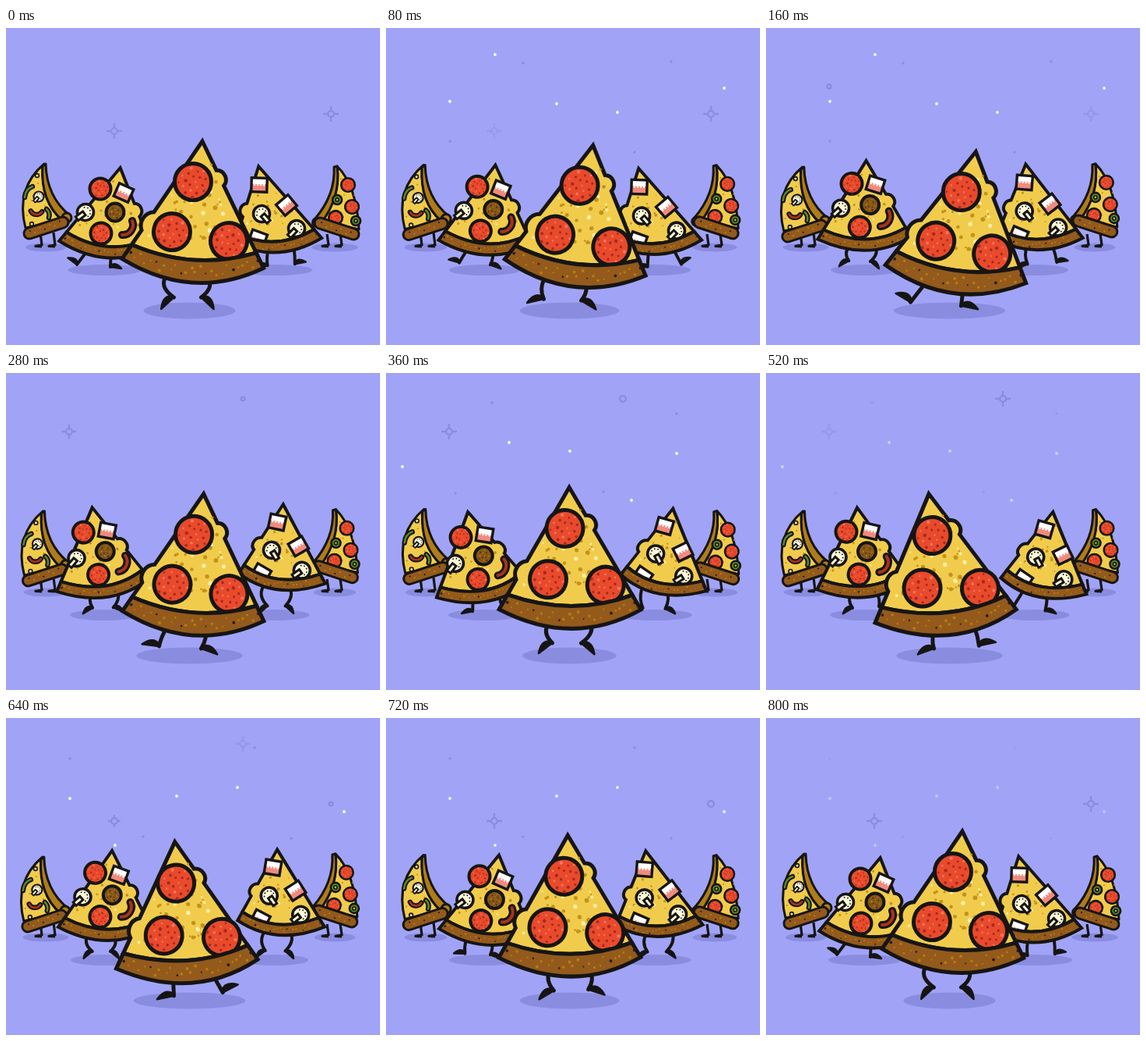
Recreate the animation shown at these times as an HTML page with a canvas. Size 480x406 px, loop 0.84 s.

```html
<!DOCTYPE html>
<html lang="en">
<head>
<meta charset="utf-8">
<title>Walking pizza slices</title>
<style>
html, body { margin: 0; width: 100%; height: 100%; overflow: hidden; background: #a1a4f6; }
canvas { display: block; width: 480px; height: 406px; }
</style>
</head>
<body>
<canvas id="stage"></canvas>
<script>
const W = 480, H = 406, LOOP = 840, STEP = 40, WALK = 800;
const SKY = '#a1a4f6', INK = '#161514', CHEESE = '#f1cc4c', CRUST = '#935a1c', RED = '#e94a2b',
      CREAM = '#fdf8d8', GOLD = '#bd8a14', GREEN = '#5f8c22', SHADE = '#8a8ce0';
const { PI, sin, cos, hypot, min, max, floor, sqrt } = Math;

const canvas = document.getElementById('stage'), ctx = canvas.getContext('2d');
const dpr = window.devicePixelRatio || 1;
canvas.width = W * dpr;
canvas.height = H * dpr;

let seed = 11;
const rnd = () => (seed = (seed * 16807) % 2147483647) / 2147483647;
const times = (n, f) => Array.from({ length: n }, (_, i) => f(i));
const wave = p => cos(2 * PI * p);
const along = ([ax, ay], [bx, by], t) => [ax + (bx - ax) * t, ay + (by - ay) * t];

function dot(x, y, r, color) {
  ctx.beginPath();
  ctx.arc(x, y, r, 0, 2 * PI);
  ctx.fillStyle = color;
  ctx.fill();
}
function disc(x, y, r, color, line) {
  dot(x, y, r, color);
  ctx.lineWidth = line;
  ctx.strokeStyle = INK;
  ctx.stroke();
}
function stroke(d, color, width) {
  ctx.lineWidth = width;
  ctx.strokeStyle = color;
  ctx.stroke(new Path2D(d));
}
function shape(d, color, line) {
  ctx.fillStyle = color;
  ctx.fill(new Path2D(d));
  stroke(d, INK, line);
}
function tube(d, color, outer, inner) {
  ctx.lineCap = 'round';
  stroke(d, INK, outer);
  stroke(d, color, inner);
  ctx.lineCap = 'butt';
}
function at(x, y, angle, draw) {
  ctx.save();
  ctx.translate(x, y);
  ctx.rotate(angle);
  draw();
  ctx.restore();
}
function shadow(x, y, rx, ry) {
  ctx.beginPath();
  ctx.ellipse(x, y, rx, ry, 0, 0, 2 * PI);
  ctx.fillStyle = SHADE;
  ctx.fill();
}

// Toppings, each drawn around its own centre
const specks = times(20, i => {
  const a = i * 2.4, d = 0.85 * sqrt((i + 0.5) / 20);
  return [d * cos(a), d * sin(a), 0.05 + 0.05 * rnd(), i % 3 ? '#a52a22' : '#f4775c'];
});
const pepperoni = (r, line) => () => {
  disc(0, 0, r, RED, line);
  for (const [x, y, s, c] of specks) dot(x * r, y * r, s * r, c);
};
const meat = r => () => {
  disc(0, 0, r, '#865619', 4);
  specks.slice(0, 12).forEach(([x, y, s], i) => dot(x * r, y * r, s * r, i % 2 ? '#3a2410' : GOLD));
};
const olive = r => () => {
  disc(0, 0, r, GREEN, 2.6);
  disc(0, 0, r * 0.35, '#a9c24a', 1.6);
};
// Stem points along +x
const mushroom = r => () => {
  ctx.scale(r / 10, r / 10);
  disc(0, 0, 10, CREAM, 3.4);
  shape('M2 -2.8H13V2.8H2Z', CREAM, 2.8);
  for (let a = 2; a < 5; a += 0.7) dot(6 * cos(a), 6 * sin(a), 0.9, INK);
};
const ham = () => {
  ctx.fillStyle = '#fff';
  ctx.fillRect(-10, -9, 20, 18);
  ctx.fillStyle = '#f08a7e';
  ctx.fillRect(-10, -1, 20, 10);
  for (const x of [-6, -2, 2, 6]) dot(x, x % 4 ? 0 : 4, 1.2, '#fff');
  ctx.lineWidth = 3.4;
  ctx.strokeStyle = INK;
  ctx.strokeRect(-10, -9, 20, 18);
};
const chili = () => tube('M5 -10A13 13 0 0 1 -8 8', '#a8331c', 10, 4);

// x, y: middle of the crust line; phase: when the tip is furthest right; beat: when the body is lowest
const slices = [
  {
    x: 126, y: 273, half: 60, h: 99, lean: 0, swing: 19, shift: 2, tilt: -0.044, roll: 0.134, drift: 2.7,
    phase: 0.97, beat: 0, bob: 5, feet: 122.5, ground: 306, size: 0.65, line: 4, sag: 0.26, freckles: 26,
    bumpR: [0.52, 9, 6],
    toppings: [
      [121, 206, 0, pepperoni(13.5, 4)], [122, 263, 2, pepperoni(13.5, 4)], [151, 211, 0.42, ham],
      [102, 236, 2.5, mushroom(10.5)], [140, 236, 0, meat(11.5)], [157, 257, 0, chili]]
  },
  {
    x: 353, y: 269, half: 56, h: 95, lean: -5, swing: 21, shift: 4, tilt: 0.075, roll: 0.14, drift: 1.5,
    phase: 0.55, beat: 0.08, bob: 6, feet: 347, ground: 306, size: 0.65, line: 4, sag: 0.26, freckles: 32,
    bumpL: [0.57, 9, 6],
    toppings: [
      [325, 201, 0.03, ham], [360, 227, -0.7, ham], [323, 270, 0.35, ham],
      [328, 238, 0.85, mushroom(10.5)], [373, 257, 2.35, mushroom(10.5)]]
  },
  {
    x: 237, y: 309, half: 91, h: 156.5, lean: 2, swing: 24, shift: 6.5, tilt: 0.017, roll: 0.113, drift: 3.5,
    phase: 0.18, beat: 0.25, bob: 7.5, feet: 233, ground: 357, size: 1, line: 5, sag: 0.18, freckles: 62,
    bumpR: [0.29, 11, 7], bumpL: [0.68, 14, 7],
    toppings: [[240, 197, 0, pepperoni(23.5, 5)], [213, 261, 1, pepperoni(23.5, 5)], [286, 273, 2, pepperoni(23.5, 5)]]
  }
];

function pose(s, p) {
  const sway = wave(p - s.phase), beat = wave(2 * (p - s.beat));
  const x = s.x + s.shift * sway, y = s.y + s.bob * beat, angle = s.tilt + s.roll * sway;
  const cx = s.half * cos(angle), cy = s.half * sin(angle);
  return {
    x, y, angle, sway, up: (1 - beat) / 2,
    tip: [x + s.lean + s.swing * sway, y - s.h], left: [x - cx, y - cy], right: [x + cx, y + cy]
  };
}

function bump(a, b, [t, half, rise]) {
  const k = half / hypot(b[0] - a[0], b[1] - a[1]), r = (half * half + rise * rise) / (2 * rise);
  return `L${along(a, b, t - k)}A${r} ${r} 0 0 1 ${along(a, b, t + k)}`;
}

// Outline and specks in the pose at the start of the loop
function bake(s) {
  const { tip, left, right } = s.rest = pose(s, 0);
  const tl = along(tip, left, 0.88), tr = along(tip, right, 0.88);
  const dip = (a, b, k) => [(a[0] + b[0]) / 2, (a[1] + b[1]) / 2 + k * hypot(b[0] - a[0], b[1] - a[1])];
  const inner = dip(tl, tr, s.sag), outer = dip(left, right, 0.27);
  const climb = s.bumpL && [1 - s.bumpL[0], s.bumpL[1], s.bumpL[2]];
  s.cheese = `M${tip}${s.bumpR ? bump(tip, right, s.bumpR) : ''}L${tr}Q${inner} ${tl}${climb ? bump(left, tip, climb) : ''}Z`;
  s.crust = `M${tl}Q${inner} ${tr}L${right}Q${outer} ${left}Z`;
  const curve = (a, c, b, t) => along(along(a, c, t), along(c, b, t), t);
  const grain = s.size * 1.1;
  s.spots = times(s.freckles, i => {
    const v = 0.12 + 0.8 * sqrt(rnd());
    return [...along(tip, along(tl, tr, 0.08 + 0.84 * rnd()), v), grain * (1 + 1.7 * rnd()), i % 4 ? '#c4921a' : '#fdeea6'];
  });
  s.grit = times(26, i => {
    const t = (i + 0.2 + 0.6 * rnd()) / 26;
    const q = along(curve(tl, inner, tr, t), curve(left, outer, right, t), 0.25 + 0.5 * rnd());
    return [...q, grain * (0.8 + 1.1 * rnd()), i % 5 ? '#b67d12' : '#2a1a0e'];
  });
}
slices.forEach(bake);

function affine(from, to) {
  const edges = q => [q.left[0] - q.tip[0], q.left[1] - q.tip[1], q.right[0] - q.tip[0], q.right[1] - q.tip[1]];
  const [ax, ay, bx, by] = edges(from), [AX, AY, BX, BY] = edges(to), det = ax * by - bx * ay;
  const a = (AX * by - BX * ay) / det, c = (BX * ax - AX * bx) / det;
  const b = (AY * by - BY * ay) / det, d = (BY * ax - AY * bx) / det, [x, y] = from.tip;
  return [a, b, c, d, to.tip[0] - a * x - c * y, to.tip[1] - b * x - d * y];
}

// One leg carries the body while the other kicks out to its side
function leg(s, now, p, side) {
  const g = s.size, kick = max(0, -side * wave(p - s.phase - 0.06)) ** 2, up = now.up;
  const hx = s.feet + g * (2 - 8 * now.sway + side * 25), hy = now.y + 15 * g;
  const ax = s.feet + side * g * (17.5 + 32 * kick), ay = s.ground - g * (12 * up + 5 * kick);
  const kx = (hx + ax) / 2 + side * g * 16 * up * (1 - kick);
  const a = (8 + 35 * up - 45 * kick) * PI / 180, len = 22 * g, lift = 12 * g;
  const ux = sin(a) * side * lift, uy = -cos(a) * lift, dx = side * cos(a) * len, dy = sin(a) * len;
  ctx.lineCap = ctx.lineJoin = 'round';
  stroke(`M${hx} ${hy}Q${kx} ${(hy + ay) / 2} ${ax} ${ay}`, INK, 2 + 3 * g);
  shape(`M${ax} ${ay}l${dx} ${dy}Q${ax + 0.4 * dx + ux} ${ay + 0.4 * dy + uy} ${ax + 0.2 * ux} ${ay + 0.2 * uy}Z`, INK, 2.5);
  ctx.lineCap = 'butt';
  ctx.lineJoin = 'miter';
}

function drawSlice(s, p) {
  const now = pose(s, p), m = affine(s.rest, now);
  const turn = now.angle - s.rest.angle, slide = s.drift * (s.rest.sway - now.sway);
  const part = (d, color, dots) => {
    ctx.save();
    ctx.transform(...m);
    shape(d, color, s.line);
    for (const q of dots) dot(...q);
    ctx.restore();
  };
  leg(s, now, p, -1);
  leg(s, now, p, 1);
  part(s.cheese, CHEESE, s.spots);
  for (const [x, y, a, draw] of s.toppings)
    at(m[0] * x + m[2] * y + m[4] + slide, m[1] * x + m[3] * y + m[5], a + turn, draw);
  part(s.crust, CRUST, s.grit);
}

// Small slices at the sides
function crumbs(x, y, slope) {
  for (let i = 0; i < 7; i++) dot(x + i * 6.3, y + i * 6.3 * slope + (i % 2 ? 2 : -2), 1, i % 3 ? GOLD : INK);
}
function smallLegs(x, y) {
  ctx.lineJoin = 'round';
  for (const k of [0, 17]) stroke(`M${x + k} ${y}l2 ${278 - y}l-8 1.4l8 .4`, INK, 3.2);
}
function leftSmall(c) {
  smallLegs(44, 262);
  at((c - 1) * 1.2, (1 - c) * 2.2, 0, () => {
    shape('M49 174Q12 205 25 256L72 246Q45 222 47 177Z', CHEESE, 3);
    shape('M47 177L51 174Q52 216 82 240L72 246Q44 222 47 177Z', '#b07c1a', 3);
    for (const [x, y] of [[40, 189], [33, 251]]) disc(x, y, 2.4, '#f6df86', 1.6);
    for (const [x, y] of [[41, 199], [50, 228], [33, 221], [27, 240]]) dot(x, y, 1, GOLD);
    tube('M24 217Q25 206 34 203', GREEN, 6.5, 2.4);
    tube('M52 232Q57 236 55 243', GREEN, 6.5, 2.4);
    at(42, 216, 2.3, mushroom(6.5));
    at(39, 236, 1, () => { ctx.scale(0.65, 0.65); chili(); });
    disc(78, 243, 6, '#b07c1a', 3);
    tube('M30 263L73 249', CRUST, 17, 11);
    crumbs(31, 262, -0.33);
  });
}
function rightSmall(c) {
  smallLegs(412, 264);
  at((c - 1) * 1.2, (c - 1) * 1.7, 0, () => {
    shape('M425 177Q450 202 453 258L404 247Q430 216 425 177Z', CHEESE, 3);
    shape('M421 178L425 177Q430 216 405 249L396 245Q423 214 421 178Z', '#b07c1a', 3);
    for (const [x, y] of [[430, 193], [434, 214], [433, 242], [447, 214]]) dot(x, y, 1, GOLD);
    [[439, 201], [444, 229], [423, 243]].forEach(([x, y], i) => at(x, y, i, pepperoni(8.8, 2.6)));
    at(425, 220, 0, olive(6));
    disc(399, 249, 5.5, '#b07c1a', 3);
    tube('M403 250L446 264', CRUST, 17, 11);
    crumbs(405, 251, 0.33);
    at(449, 247, 0, olive(6));
  });
}

// Sky: sparks with their start times, and dots mirrored for each burst
const SPARKS = [[81, 75, 130], [304, 33, 260], [139, 132, 522], [417, 110, 620]];
const WHITE = [[140, 34], [82, 94], [219, 97], [297, 108], [434, 77]];
const DARK = [[176, 45], [366, 43], [82, 145], [319, 159]];
const BURSTS = [
  [40, 240, (x, y) => [x, y]],
  [320, 280, (x, y) => [455 - x, 197 - y]],
  [570, 290, (x, y) => [x, 197 - y]]];

function spark(x, y, age) {
  if (age > 460) return;
  const r = min(10, 2.5 + age / 22);
  ctx.globalAlpha = max(0, min(1, (460 - age) / 165));
  ctx.strokeStyle = SHADE;
  ctx.lineWidth = 2.4;
  ctx.beginPath();
  ctx.arc(x, y, min(3.9, 2 + age / 50), 0, 2 * PI);
  ctx.stroke();
  if (age > 105)
    stroke(`M${x - r} ${y}H${x - 4}M${x + 4} ${y}H${x + r}M${x} ${y - r}V${y - 4}M${x} ${y + 4}V${y + r}`, SHADE, 2.4);
  ctx.globalAlpha = 1;
}
function sky(t) {
  ctx.fillStyle = SKY;
  ctx.fillRect(0, 0, W, H);
  for (const [x, y, start] of SPARKS) spark(x, y, (t - start + LOOP) % LOOP);
  for (const [start, life, flip] of BURSTS) {
    const a = (t - start) / life;
    if (a <= 0 || a >= 1) continue;
    ctx.globalAlpha = min(1, a * 8, (1 - a) / 0.55);
    for (const q of WHITE) dot(...flip(...q), 1.9, '#fffbe8');
    for (const q of DARK) dot(...flip(...q), 1.8, SHADE);
    ctx.globalAlpha = 1;
  }
}

function draw(t) {
  const p = t / WALK, bob = wave(2 * p);
  ctx.setTransform(dpr, 0, 0, dpr, 0, 0);
  sky(t);
  shadow(51, 281, 28 - 2 * bob, 5.5);
  shadow(422, 281, 28 + 2 * bob, 5.5);
  shadow(126.5, 310, 45 + 2 * bob, 7);
  shadow(344.5, 310, 46 + 3 * bob, 7);
  shadow(235.5, 362, 66 - 7 * bob, 10.5);
  leftSmall(bob);
  rightSmall(bob);
  ctx.lineJoin = 'miter';
  for (const s of slices) drawSlice(s, p);
}

function tick() {
  draw(floor(performance.now() % LOOP / STEP) * STEP);
  requestAnimationFrame(tick);
}
tick();
</script>
</body>
</html>
```
